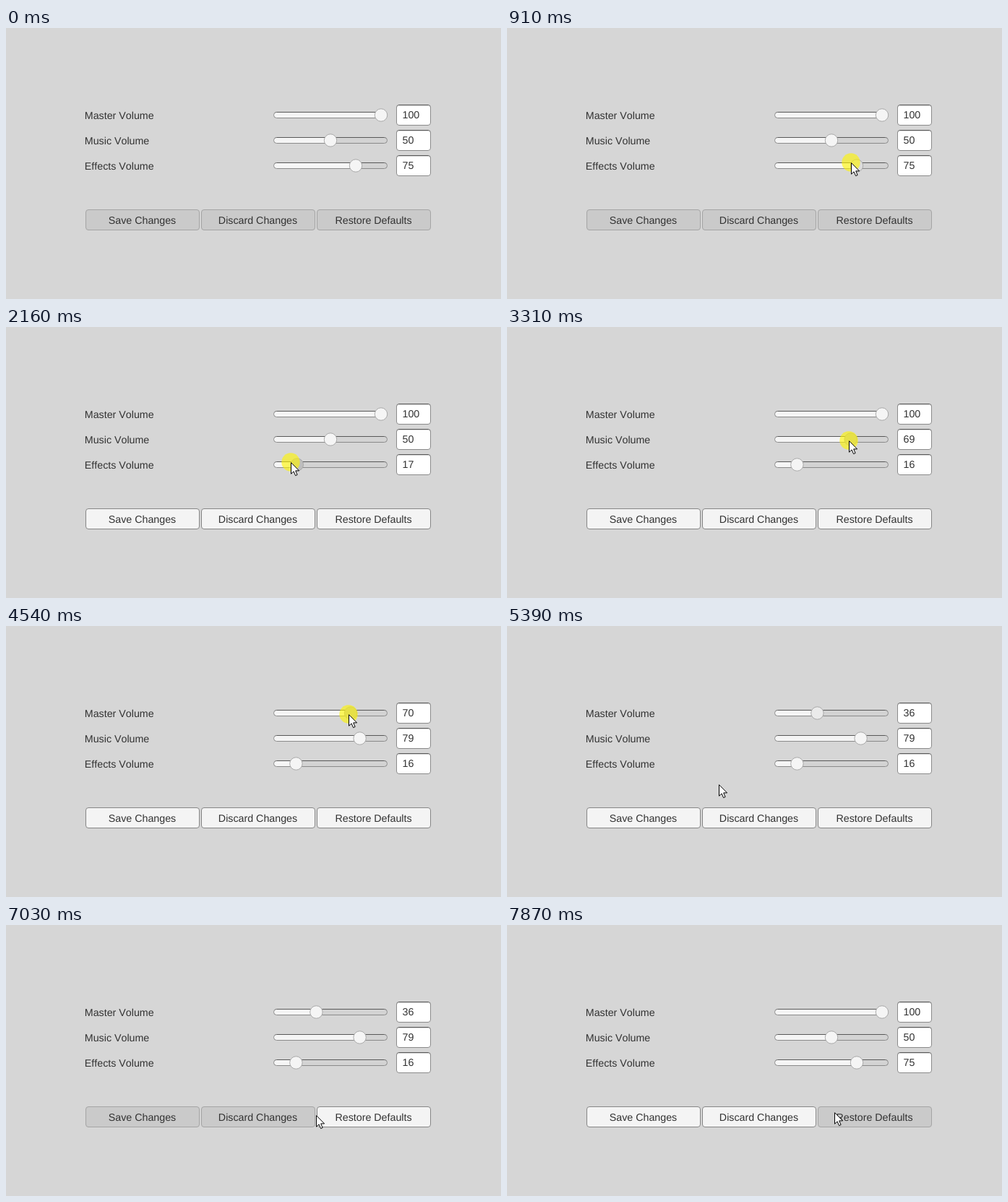
An HTML page that plays this animation: 685 by 375 pixels, repeating every 8 s.

```html
<!DOCTYPE html>
<html lang="en">
<head>
<meta charset="utf-8">
<title>Volume settings</title>
<style>
  html, body { margin: 0; width: 685px; height: 375px; overflow: hidden; background: #d6d6d6; }
  svg { display: block; }
  text {
    font: 14.25px "Liberation Sans", Arial, sans-serif;
    font-kerning: none; text-rendering: geometricPrecision; fill: #323232;
  }
</style>
</head>
<body>
<svg id="stage" width="685" height="375" viewBox="0 0 685 375">
  <defs>
    <linearGradient id="edge" x1="0" y1="0" x2="0" y2="1">
      <stop offset="0" stop-color="#585858"/>
      <stop offset="0.15" stop-color="#8c8c8c"/>
      <stop offset="1" stop-color="#8a8a8a"/>
    </linearGradient>
  </defs>
</svg>
<script>
const LOOP = 8000, TICK = 77.4, START = 197, LAST = 99;
const SAVE = 77, RESTORE = 95, RESET = 97, EDITED = 11;
const NORMAL = 245, PRESSED = 190, SELECTED = 235, ON = 244, OFF = 202;
const stage = document.getElementById('stage');

function add(tag, attrs, text) {
  const el = document.createElementNS('http://www.w3.org/2000/svg', tag);
  set(el, attrs);
  if (text) el.textContent = text;
  stage.appendChild(el);
  return el;
}
function set(el, attrs) {
  for (const name in attrs) el.setAttribute(name, attrs[name]);
}
const clamp = (v, lo, hi) => Math.min(hi, Math.max(lo, v));
const mix = (a, b, m) => a + (b - a) * m;
const ease = u => u * u * (3 - 2 * u);
const gray = v => `rgb(${v},${v},${v})`;

// Each pointer move: begin, end, x, y and an optional downward bend
const home = { x: 428, y: 335 };
const moves = [
  [0, 5, 485, 166], [5, 7, 476, 186],
  [10, 26, 393.4, 187],
  [28, 35, 446.4, 157],
  [38.5, 40, 473, 157], [40, 44, 487, 157],
  [45, 51, 516, 122],
  [52, 60.3, 427, 122],
  [62, 70.2, 225, 269],
  [83, 89.1, 448, 258, 13],
  [93, 94, 453, 259]
];

function pointer(k) {
  let { x, y } = home;
  for (const [begin, end, toX, toY, bend = 0] of moves) {
    if (k < begin) break;
    const e = ease(clamp((k - begin) / (end - begin), 0, 1));
    x = mix(x, toX, e);
    y = mix(y, toY, e) + 4 * bend * e * (1 - e);
  }
  return { x, y };
}

// Gray level after [tick, level] changes, each fading in quickly
function shade(k, level, changes) {
  for (const [at, to] of changes) {
    if (k >= at) level = mix(level, to, clamp((k - at + 0.6) / 1.3, 0, 1));
  }
  return Math.round(level);
}

const holds = [[SAVE, SAVE + 1], [RESTORE, RESET]];

function makeSlider(label, y, start, press, release, blur) {
  holds.push([press, release]);
  const bar = { x: 370.5, y: y - 4, width: 157, height: 8, rx: 4 };
  add('text', { x: 108.8, y: y + 5.5 }, label);
  add('rect', { ...bar, fill: '#d3d3d3' });
  const fill = add('rect', { ...bar, fill: '#f5f5f5' });
  add('rect', { ...bar, fill: 'none', stroke: 'url(#edge)' });
  const knob = add('circle', { cy: y, r: 8.7, stroke: '#a2a2a2', 'stroke-width': 0.9 });
  add('rect', { x: 540.5, y: y - 14, width: 47, height: 28, rx: 3.5, fill: '#fff', stroke: 'url(#edge)' });
  add('path', { d: `M543 ${y - 13}H585`, stroke: '#d8d8d8' });
  const num = add('text', { x: 548.5, y: y + 4.8 });
  return k => {
    let v = start;
    if (k >= press && k < RESET) {
      v += (pointer(Math.min(k, release - 1)).x - pointer(press).x) / 1.4;
    }
    v = Math.round(clamp(v, 0, 100));
    const x = 379 + v * 1.4;
    const level = shade(k, NORMAL, [[press, PRESSED], [release, SELECTED], [blur, NORMAL]]);
    set(fill, { width: x - bar.x });
    set(knob, { cx: x, fill: gray(level) });
    num.textContent = v;
  };
}

function makeButton(label, x, changes) {
  const box = add('rect', { x: x + 0.5, y: 251.5, width: 157, height: 28, rx: 3.5 });
  add('text', { x: x + 78.5, y: 271, 'text-anchor': 'middle' }, label);
  return k => {
    const level = shade(k, OFF, [[EDITED, ON], ...changes]);
    const line = mix(164, 134, (level - OFF) / (ON - OFF));
    set(box, { fill: gray(level), stroke: gray(Math.round(line)) });
  };
}

const parts = [
  makeSlider('Master Volume', 120.5, 100, 52, 63, SAVE),
  makeSlider('Music Volume', 155.5, 50, 36, 46, 52),
  makeSlider('Effects Volume', 190.5, 75, 9, 29, 36),
  makeButton('Save Changes', 110, [[SAVE, OFF], [RESET, ON]]),
  makeButton('Discard Changes', 270, [[SAVE + 1, OFF], [RESET, ON]]),
  makeButton('Restore Defaults', 430, [[RESTORE, OFF]])
];

const halo = add('circle', { r: 12.7, fill: '#fff500', 'fill-opacity': 0.62 });
const arrow = add('path', {
  d: 'M.5 .7V16.2L4.1 12.9L6.6 18.6L9.1 17.5L6.7 11.9H11.6Z',
  fill: '#fff', stroke: '#000', 'stroke-linejoin': 'round'
});

function draw(ms) {
  const k = Math.min(LAST, Math.floor((ms % LOOP - START) / TICK));
  for (const part of parts) part(k);
  const down = holds.some(([from, to]) => k >= from && k < to);
  arrow.style.display = k >= 0 ? '' : 'none';
  halo.style.display = down ? '' : 'none';
  const p = pointer(k), x = Math.round(p.x), y = Math.round(p.y);
  set(halo, { cx: x, cy: y });
  set(arrow, { transform: `translate(${x} ${y})` });
}

const began = performance.now();
function tick() {
  draw(performance.now() - began);
  requestAnimationFrame(tick);
}
tick();
</script>
</body>
</html>
```
